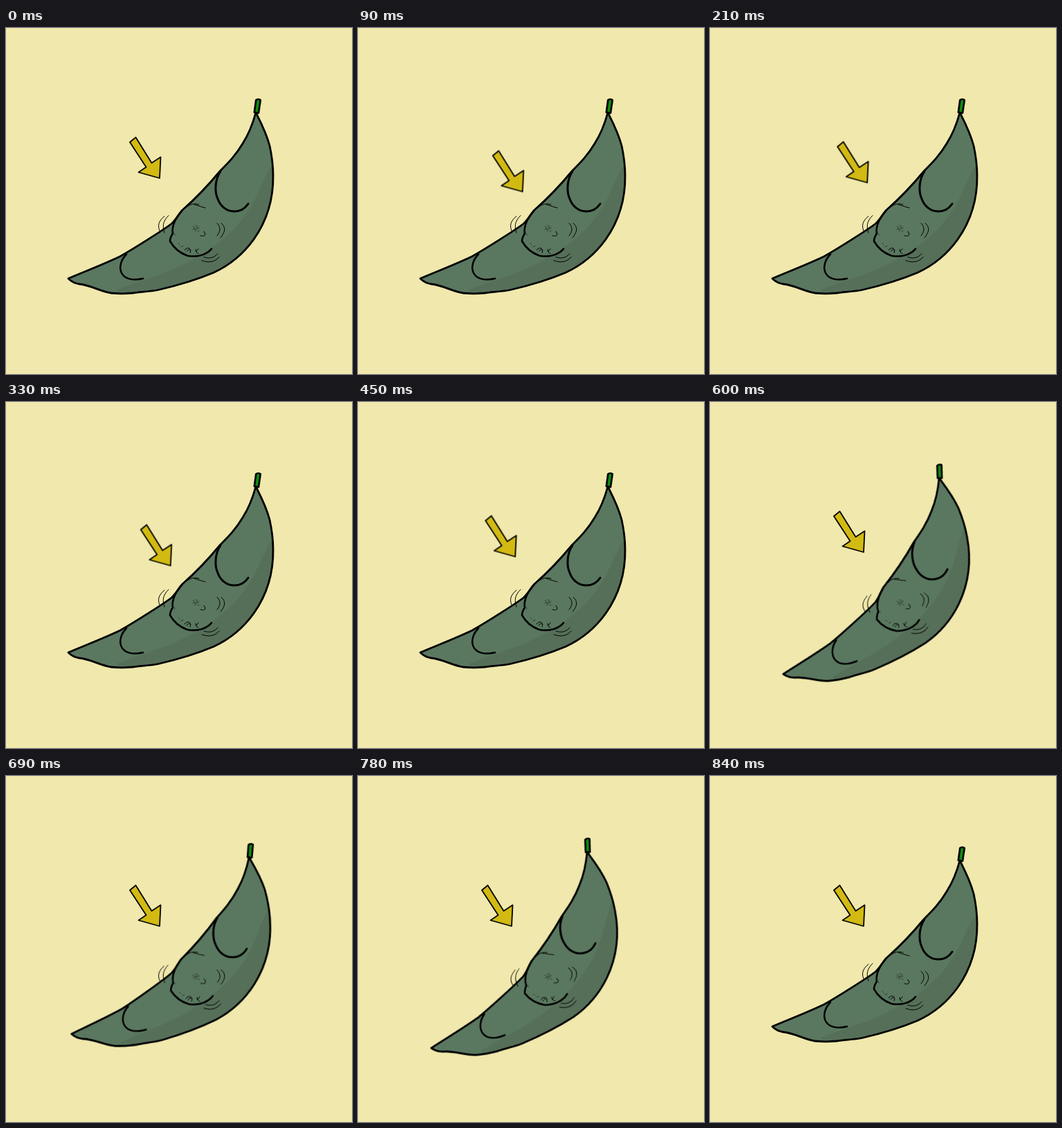
An HTML page without scripts that plays this animation: 500x500 px, repeating every 1.47 s.

```html
<!DOCTYPE html>
<html lang="en">
<head>
<meta charset="utf-8">
<title>Wiggling pod</title>
<style>
  html, body { margin: 0; width: 100%; height: 100%; overflow: hidden; background: #f0e8ac; }
  svg { display: block; width: 100%; height: 100%; }
  .ink { fill: none; stroke: #000; stroke-linecap: round; stroke-linejoin: round; }
  .thin { stroke-width: 1; }
  .faint { stroke-width: .8; stroke: #1c2a20; }
  .arrow, .pod { animation: 1470ms -2ms infinite; }
  .arrow { animation-name: poke; animation-timing-function: steps(4, end); }
  .pod { animation-name: wiggle; animation-timing-function: step-end; transform-origin: 276px 287px; }

  /* two pokes of 240 ms, then two wiggles of 180 ms, then rest */
  @keyframes poke {
    0%, 16.327%, 32.653%, 100% { transform: translate(0, 0); }
    8.163%, 24.49% { transform: translate(21px, 26px); }
  }
  @keyframes wiggle {
    0%, 44.898%, 57.143%, 100% { transform: rotate(0deg); }
    34.694%, 42.857%, 46.939%, 55.102% { transform: rotate(-3.35deg); }
    36.735%, 40.816%, 48.98%, 53.061% { transform: rotate(-10deg); }
    38.776%, 51.02% { transform: rotate(-15deg); }
  }
</style>
</head>
<body>
<svg viewBox="0 0 500 500">
  <defs>
    <path id="shell" d="M361 122C356 141 349 156 342 167C332 184 321 195 309 207C291 229 272 248 255 263C248 271 245 278 239 283C227 292 186 318 165 330C142 341 116 351 90 362C94 366 99 369 106 370C124 372 134 380 152 383C161 384 173 384 183 383C196 381 208 381 220 378.500C248 372 275 364 300 353.500C325 342 344 325 358 305.500C376 280 386.500 248 386 213C386 198 384 184 381 170C376 151 368 136 361 122Z"/>
    <clipPath id="inside"><use href="#shell"/></clipPath>
  </defs>

  <g class="pod">
    <path class="ink" d="M361.300 104Q364.500 102 367.800 104L365 123L358.800 122Z" style="fill:#0f8a12" stroke-width="2.600"/>
    <use href="#shell" fill="#5a7860"/>
    <path clip-path="url(#inside)" fill="#566f59" d="M390 190C372 213 366 244 343 274C318 308 270 339 222 356C200 364 176 372 160 378L165 400H400Z"/>
    <use href="#shell" class="ink" stroke-width="2.800"/>

    <path class="ink" stroke-width="3" d="M310 207C302 219 301 236 306 247C310 258 319 265 330 265C339 265 346 260 350 254"/>
    <path class="ink" stroke-width="2.500" d="M174 327C166 335 163 346 167 354C172 364 186 365 198 362"/>
    <path class="ink" stroke-width="2.600" d="M254 264C245 275 239 286 241 297Q237 303 237 308C242 317 251 325 262 329C277 332 291 327 297 319"/>

    <path class="ink thin" d="M262 258Q269 252 279 255M272 255Q281 258 288 260"/>
    <path class="ink thin" d="M235 271C226 279 226 288 229 296M229 272C220 279 219 286 222 293M305 282C311 288 310 294 305 300M311 282C318 288 317 295 310 303M286 331C294 334 301 332 306 326M283 336C293 340 302 338 308 331"/>
    <path class="ink thin" d="M281 300Q287 302 288 298L286 294"/>
    <path class="ink faint" d="M270 287l3 2M274 285l2 3M270 291l4-1M275 290l4-1M273 294l2-3M277 293l2 1M277 286l1 1M240 292l1 3M243 297l1 2M249 311l2 2M253 316l3-1"/>
    <path class="ink thin" d="M258 321Q261 316 266 319M261 323Q263 319 267 321L266 325M274 320Q274 325 278 326M278 319L275 323"/>
  </g>

  <path class="arrow ink" style="fill:#d2ba12" stroke-width="1.800" d="M179 165L187.500 158L210.500 195L223.500 186.500L222 217L191.500 208.500L202.500 201Z"/>
</svg>
</body>
</html>
```
